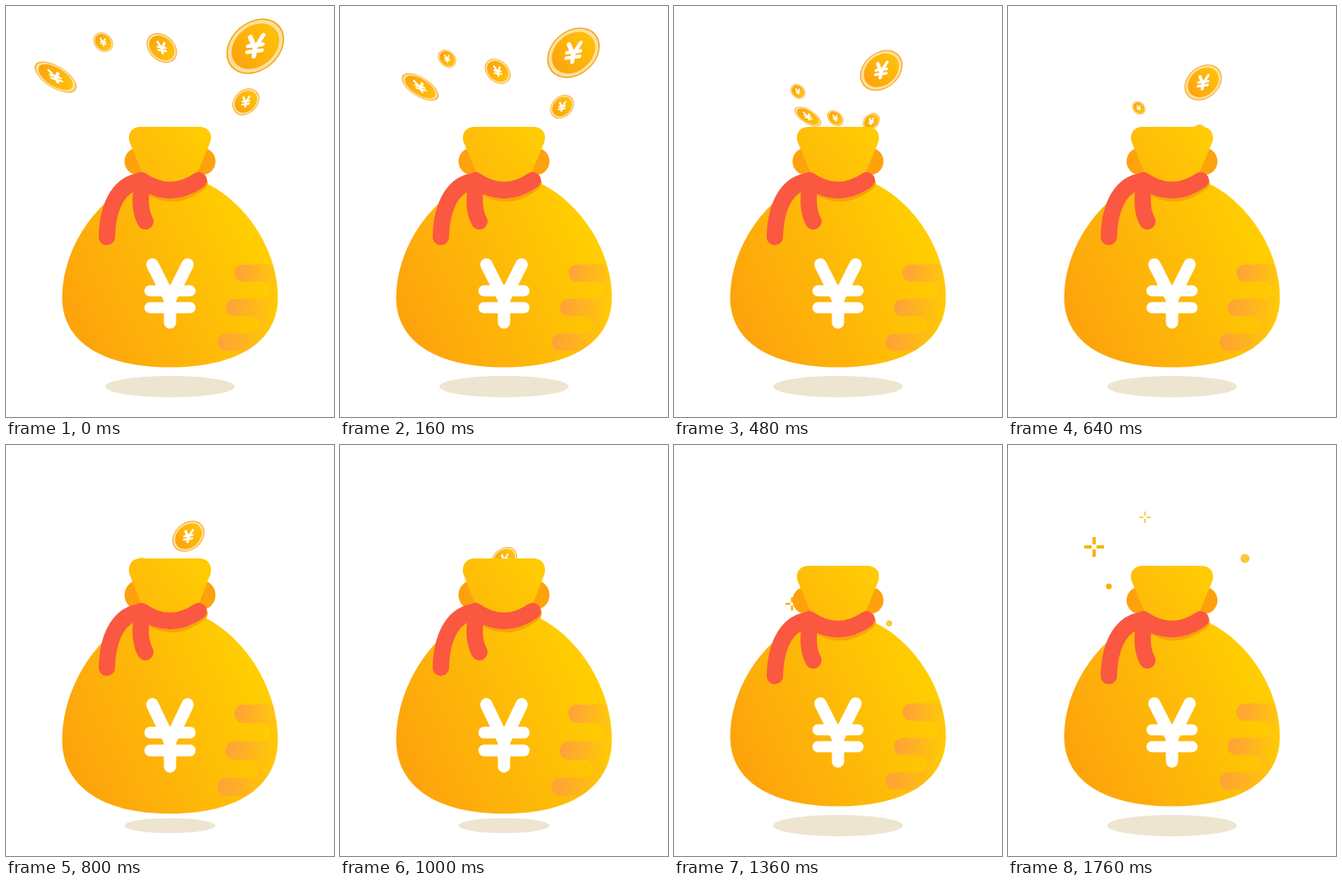
An HTML page for the animation above (2 s loop, 400 by 500 pixels).

```html
<!DOCTYPE html>
<html lang="en">
<head>
<meta charset="utf-8">
<title>Money bag</title>
<style>
  html, body { margin: 0; width: 100%; height: 100%; overflow: hidden; background: #fff; }
  svg { display: block; width: 100vw; height: 100vh; }
  .ribbon { fill: none; stroke: #fa5841; stroke-width: 20; stroke-linecap: round; stroke-linejoin: round; }
  .yen { fill: none; stroke: #fff; stroke-width: 15; stroke-linecap: round; stroke-linejoin: round; }
</style>
</head>
<body>
<svg viewBox="0 0 400 500">
  <defs>
    <linearGradient id="gold" gradientUnits="userSpaceOnUse" x1="85" y1="380" x2="305" y2="275">
      <stop offset="0" stop-color="#fda40c"/>
      <stop offset=".5" stop-color="#feb908"/>
      <stop offset="1" stop-color="#ffce00"/>
    </linearGradient>
    <linearGradient id="neck" x1="0" y1=".7" x2="1" y2=".2">
      <stop offset="0" stop-color="#ffb90a"/>
      <stop offset="1" stop-color="#ffcc02"/>
    </linearGradient>
    <linearGradient id="coin" x1="0" y1=".5" x2="1" y2=".5">
      <stop offset="0" stop-color="#fca40e"/>
      <stop offset="1" stop-color="#ffc107"/>
    </linearGradient>
    <linearGradient id="glow" gradientUnits="userSpaceOnUse" x1="280" y1="325" x2="338" y2="339">
      <stop offset="0" stop-color="#ffa03c" stop-opacity=".95"/>
      <stop offset="1" stop-color="#ffa83c" stop-opacity="0"/>
    </linearGradient>
    <path id="body" d="M166 211C108 234 68.500 297 68.500 355C68.500 408 117 439.500 200 439.500S331.500 408 331.500 355C331.500 297 292 234 234 211Z"/>
    <clipPath id="inside"><use href="#body"/></clipPath>
    <g id="yen" class="yen">
      <path d="M-21.5-35.5 0 7 21.5-35.5M0 7V35"/>
      <path d="M-24.5-3.5H24.5M-24.5 17H24.5" stroke-width="13.5"/>
    </g>
    <path id="star" d="M-12 0H-3M3 0H12M0-12V-3M0 3V12"/>
    <circle id="dot" r="5.5"/>
  </defs>

  <ellipse id="shadow" rx="79" ry="13" fill="#ede5d0"/>
  <g id="coins"></g>
  <g id="sparks"></g>

  <g id="bag">
    <g fill="#fda20c">
      <circle cx="161" cy="189" r="16.5"/>
      <circle cx="239" cy="189" r="16.5"/>
    </g>
    <use href="#body" fill="url(#gold)"/>
    <path fill="url(#neck)" d="M164 147H236C247 147 252.500 156 249 166L236 197Q230 214 200 214T164 197L151 166C147.500 156 153 147 164 147Z"/>
    <path clip-path="url(#inside)" fill="url(#glow)" d="M289 314.500H340V419.500H268.500a10.500 10.500 0 0 1 0-21H298a10.500 10.500 0 0 0 0-21H278.500a10.500 10.500 0 0 1 0-21H311.500a10.500 10.500 0 0 0 0-21H289a10.500 10.500 0 0 1 0-21Z"/>
    <use href="#yen" x="200" y="350"/>
  </g>

  <g id="tie" class="ribbon">
    <path d="M172 218Q203 241 237 215" stroke="#f8a30a" stroke-width="18"/>
    <path d="M165 213C140 215 124 240 123 281M166 218Q161 246 170 262"/>
    <path d="M165 212Q200 236 235 212"/>
  </g>
</svg>
<script>
const LOOP = 2000, STEP = 40;
const $ = id => document.getElementById(id);

function add(parent, tag, attrs) {
  const el = document.createElementNS("http://www.w3.org/2000/svg", tag);
  for (const k in attrs) el.setAttribute(k, attrs[k]);
  return parent.appendChild(el);
}

// x and y are polynomial coefficients; one unit of time is 320 ms.
const coins = [
  { x: [60.5, 77.5, -6], y: [86.5, 20, 8], shrink: .245, rx: 29, ry: 13.2, tilt: 32 },
  { x: [118.5, 25.5, -2.5], y: [44, 40], shrink: .16, rx: 13.2, ry: 10.5, tilt: 43 },
  { x: [190, 4.5], y: [51, 57], shrink: .31, rx: 20.8, ry: 15.4, tilt: 42 },
  { x: [292.5, -47.75, 8.75], y: [116.5, 10, 4], shrink: .24, rx: 18.2, ry: 14.2, tilt: -44 },
  { x: [304, -42, 7.5, -1.5], y: [49, 14.5, 2.25, .75], shrink: .177, rx: 38.8, ry: 29.6, tilt: -40 }
];

const sparks = [
  { shape: "star", from: [200, 293], to: [105, 124], start: 1180, end: 1680, size: 1, color: "#f6b40c", line: 4 },
  { shape: "star", from: [200, 293], to: [167, 88], start: 1310, end: 1760, size: .58, color: "#fad068", line: 3.6 },
  { shape: "dot", from: [224, 331], to: [289, 138], start: 1180, end: 1680, size: 1, color: "#fbc73c" },
  { shape: "dot", from: [200, 293], to: [123, 172], start: 1180, end: 1680, size: .65, color: "#f6b108" }
];

// A coin is a round disc with an upright sign, flattened across its tilt.
for (const c of coins) {
  c.el = add($("coins"), "g", {});
  const face = add(c.el, "g", { transform: `rotate(${c.tilt}) scale(1 ${c.ry / c.rx})` });
  const disc = (k, fill) => add(face, "circle", { r: c.rx * k, fill });
  disc(1, "#f5a71f");
  disc(.95, "#ffe09a");
  disc(.82, "#f9a817");
  disc(.8, "url(#coin)");
  add(face, "use", { href: "#yen", transform: `rotate(${-c.tilt}) scale(${c.rx * .0105})` });
}

for (const s of sparks) {
  const paint = s.line ? { stroke: s.color, "stroke-width": s.line } : { fill: s.color };
  s.el = add($("sparks"), "use", { href: "#" + s.shape, ...paint });
}

const clamp = v => Math.min(1, Math.max(0, v));
const mix = (a, b, p) => a + (b - a) * p;
const poly = (k, u) => k.reduceRight((sum, v) => sum * u + v, 0);

// Linear interpolation through [time, value] pairs.
function track(t, keys) {
  let [t0, v0] = keys[0];
  for (const [t1, v1] of keys) {
    if (t < t1) return mix(v0, v1, clamp((t - t0) / (t1 - t0)));
    [t0, v0] = [t1, v1];
  }
  return v0;
}

function place(el, x, y, size) {
  el.setAttribute("transform", `translate(${x} ${y}) scale(${size})`);
}

function show(el, on) {
  el.setAttribute("visibility", on ? "visible" : "hidden");
}

function draw(t) {
  const u = t / 320;
  for (const c of coins) {
    const size = 1 - c.shrink * u;
    show(c.el, size > 0 && t < 1120);
    place(c.el, poly(c.x, u), poly(c.y, u), Math.max(size, 0));
  }

  for (const s of sparks) {
    const p = clamp((t - s.start) / (s.end - s.start));
    const e = 1 - (1 - p) ** 2;
    show(s.el, p > 0);
    place(s.el, mix(s.from[0], s.to[0], e), mix(s.from[1], s.to[1], e), s.size * mix(.2, 1, e));
  }

  const wide = track(t, [[1000, 1], [1200, 1.065], [1360, 1]]);
  const tall = track(t, [[640, 1], [800, 1.062], [1000, 1.062], [1200, 1]]);
  const shade = track(t, [[640, 1], [800, .7], [1000, .7], [1200, 1.05], [1360, 1]]);
  const lift = track(t, [[640, 0], [800, -10], [1040, -10], [1360, 0]]);
  $("bag").setAttribute("transform", `translate(200 293) scale(${wide} ${tall}) translate(-200 -293)`);
  place($("shadow"), 200, 463, shade);
  place($("tie"), 0, lift, 1);
}

const begin = performance.now();
function tick() {
  const t = (performance.now() - begin) % LOOP;
  draw(Math.floor(t / STEP) * STEP);
  requestAnimationFrame(tick);
}
tick();
</script>
</body>
</html>
```
